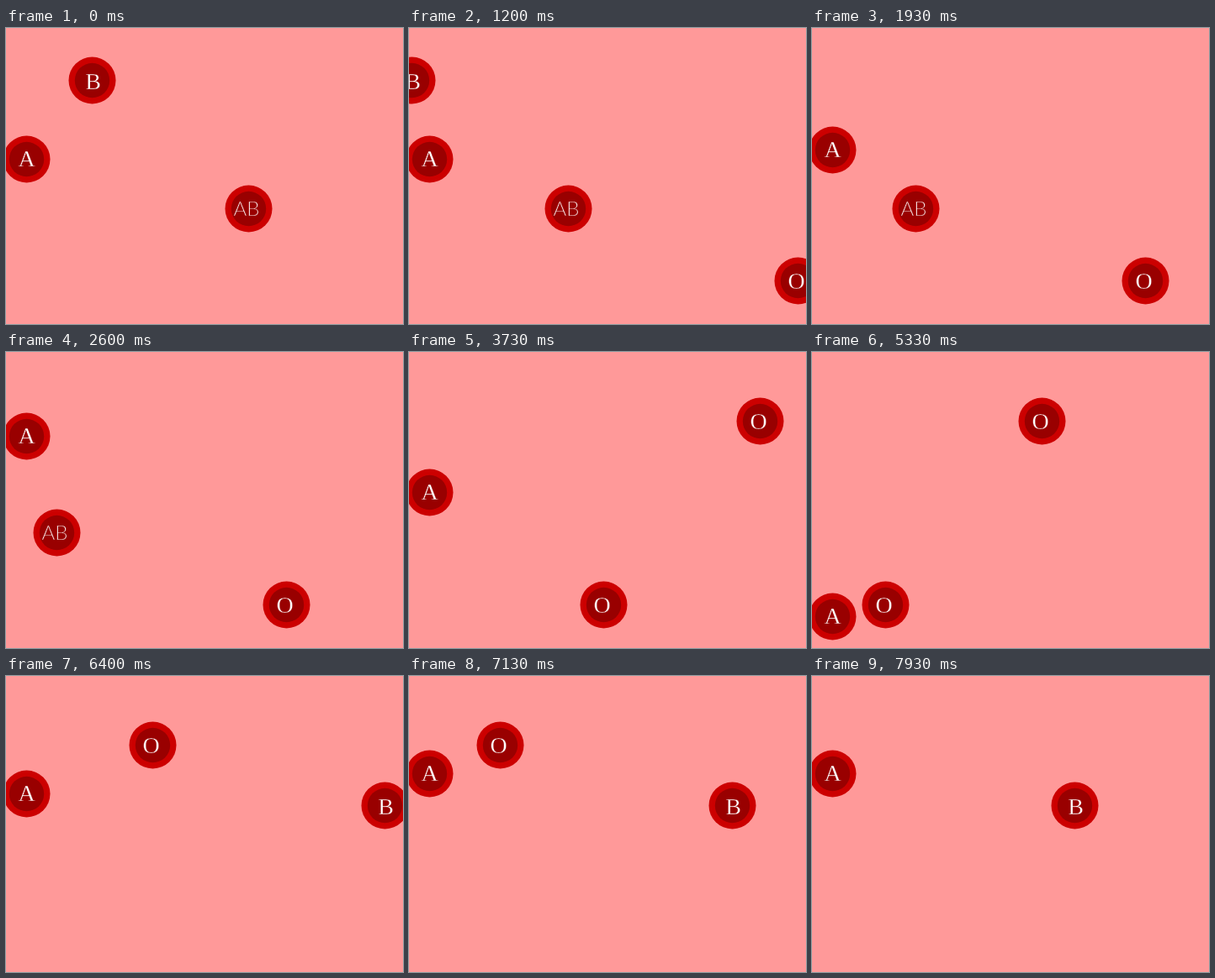
An HTML page that plays this animation: 472x353 px, repeating every 8000 ms.

```html
<!DOCTYPE html>
<html lang="en">
<head>
<meta charset="utf-8">
<title>Blood cells</title>
<style>
  html, body { margin: 0; width: 100%; height: 100%; overflow: hidden; background: #f99; }
  svg { display: block; width: 472px; height: 353px; }
  text {
    font: 28px "Liberation Serif", "Times New Roman", serif;
    fill: #fff; stroke: #900; stroke-width: .3px; text-anchor: middle;
  }
  .pair { font: 300 24px Lato, sans-serif; }
</style>
</head>
<body>
<svg id="stage" viewBox="0 0 472 353"></svg>
<script>
const LOOP = 8000, TICK = 200 / 3;
const SPEED = 3, SPAWN_X = 481, CATCH_X = 80.5, EXIT_X = -30;
const NS = "http://www.w3.org/2000/svg";
const stage = document.getElementById("stage");

// Label offset from the cell centre: x, baseline y
const LABELS = { A: [0, 8], B: [1, 10], O: [-2, 9.5], AB: [-2.5, 8] };

function add(parent, tag, attrs) {
  const el = document.createElementNS(NS, tag);
  for (const key in attrs) el.setAttribute(key, attrs[key]);
  return parent.appendChild(el);
}

function makeCell(type) {
  const g = add(stage, "g", {});
  add(g, "circle", { r: 28, fill: "#c00" });
  add(g, "circle", { r: 20.7, fill: "#900" });
  const [x, y] = LABELS[type];
  const label = add(g, "text", { x, y, class: type.length > 1 ? "pair" : "single" });
  label.textContent = type;
  return g;
}

// x is the cell's place at step 0; O cells vanish on contact with A
const drifters = [
  { type: "B", x: 102.5, y: 62.5 },
  { type: "AB", x: 288.5, y: 215.5 },
  { type: "O", x: 561.5, y: 301.5 },
  { type: "O", x: 747.5, y: 82.5 },
  { type: "B", x: 1023.5, y: 154.5 }
].map(d => ({ ...d, el: makeCell(d.type), end: d.type === "O" ? CATCH_X : EXIT_X }));

// The player dodges or chases with a few eased moves
const player = makeCell("A");
const PLAYER_X = 24.5, PLAYER_Y = 156.5;
const moves = [
  { at: 1650, time: 1020, by: -57 },
  { at: 3025, time: 1900, by: 216 },
  { at: 5430, time: 960, by: -175 },
  { at: 6500, time: 400, by: -24 }
];

function ease(u) {
  const c = Math.min(1, Math.max(0, u));
  return c * c * (3 - 2 * c);
}

function playerY(t) {
  const shift = moves.reduce((sum, m) => sum + m.by * ease((t - m.at) / m.time), 0);
  return PLAYER_Y + Math.round(shift);
}

function place(el, x, y) {
  el.setAttribute("transform", `translate(${x} ${y})`);
}

function draw(now) {
  const tick = Math.floor((now % LOOP + 4) / TICK) % 120;
  // Two steps per tick, with one extra every 60 ticks
  const step = Math.max(0, 2 * tick - 3 + Math.floor((tick + 30) / 60));
  for (const d of drifters) {
    const x = d.x - SPEED * step;
    const shown = x < SPAWN_X && x > d.end;
    d.el.setAttribute("visibility", shown ? "visible" : "hidden");
    place(d.el, x, d.y);
  }
  place(player, PLAYER_X, playerY(tick * TICK));
}

const start = performance.now();
function frame() {
  draw(performance.now() - start);
  requestAnimationFrame(frame);
}
frame();
</script>
</body>
</html>
```
